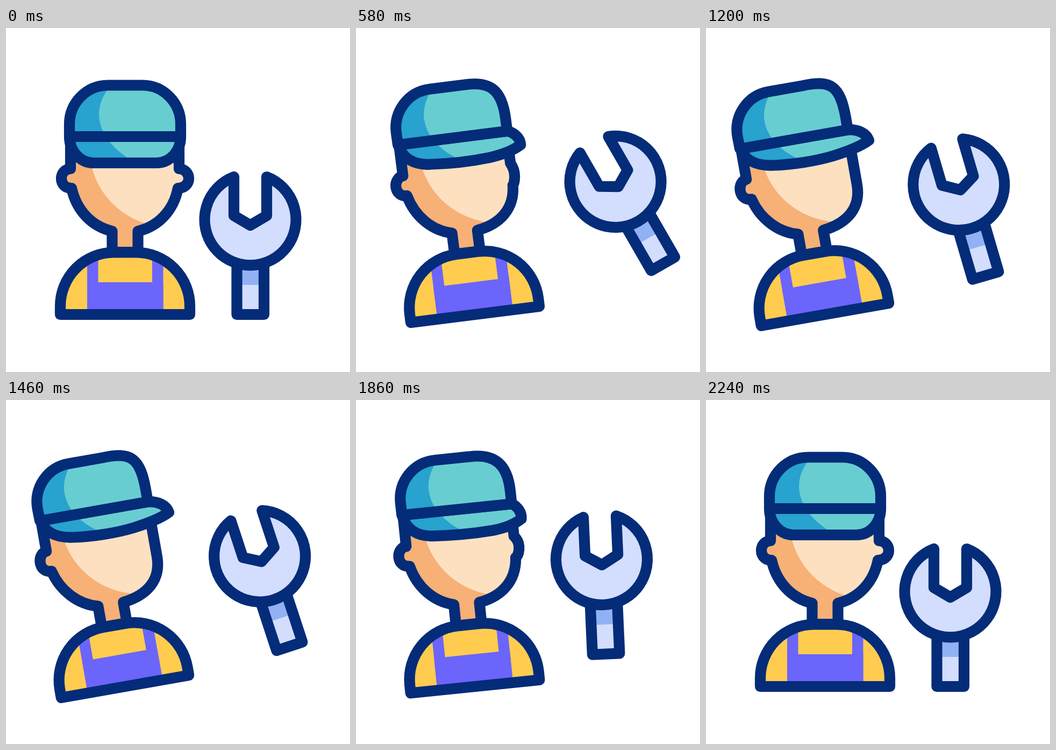
Recreate the animation shown at these times as an HTML page with a canvas. Size 640 by 640 pixels, loop 2.4 s.

```html
<!DOCTYPE html>
<html lang="en">
<head>
<meta charset="utf-8">
<title>Mechanic with wrench</title>
<style>
html, body { margin: 0; width: 100%; height: 100%; overflow: hidden; background: #fff; }
canvas { display: block; width: 640px; height: 640px; }
</style>
</head>
<body>
<canvas id="stage" width="640" height="640"></canvas>
<script>
const ctx = document.getElementById('stage').getContext('2d');
const LOOP = 2400;
const NAVY = '#042c78';
const RAD = Math.PI / 180;
const TILT_MIN = -2.6, TILT_MAX = -30;

// Each shape has a front pose and a turned pose with the same structure.
const head = [
  'M120,202 L120,262 C110,262 103,270 103,280 C103,290 110,298 122,298 C131,339 159,369 197.5,378 L197.5,417 L245.5,417 L245.5,378 C284,369 312,339 320,298 C332,298 340,290 340,280 C340,270 332,262 322,262 L322,202 Z',
  'M121,202 L121,260 C113,260 106,269 106,279 C106,290 113,298 124,298 C134,338 163,368 198,377 L198,417 L245.5,417 L245.5,378 C292,373 322,349 322,305 C322,300 322,290 322,282 C322,276 322,270 322,262 L322,202 Z'
];
const crown = [
  'M118,202 L118,179 C118,139 150,106.5 190,106.5 L254,106.5 C293,106.5 325,139 325,179 L325,202 Z',
  'M119,202 L118.5,179 C118.5,139 150,106.5 190,106.5 L254,106.5 C309,104 323,120 323,179 L323,202 Z'
];
const brim = [
  'M118,202 C118,229 138,251 163,251 C202,251 241,251 280,251 C292.5,251 303.75,245.5 312,236.6 C320,227.75 325,215.5 325,202 Z',
  'M120,202 C126,228 146,239 175,243 C210,248 253,249 288,245 C316,241.5 340,237 358,228 C356,214 342,205 325,202 Z'
];
const capLight = new Path2D('M196,105 C180,125 173,142 173,160 C173,192 195,225 240,250 L380,260 L380,90 Z');
const faceLight = new Path2D('M157,245 C165,300 205,350 270,367 L360,390 L360,190 L157,190 Z');
const torso = new Path2D('M101,533 V517.5 A100,100 0 0 1 201,417.5 H242 A100,100 0 0 1 342,517.5 V533 Z');
const handle = new Path2D('M429.5,430 V533 H480 V430 Z');
const jaw = new Path2D('M424,277 V349 L454.5,367 L485,349 V277 A85,85 0 1 1 424,277 Z');

function morph([a, b], k) {
  const to = b.match(/[\d.]+/g);
  let i = 0;
  return new Path2D(a.replace(/[\d.]+/g, n => (+n + (to[i++] - n) * k).toFixed(3)));
}

// Cubic ease-in-out with handles at .42 and .58
function ease(x) {
  if (x <= 0) return 0;
  if (x >= 1) return 1;
  let lo = 0, hi = 1, s = 0.5;
  for (let i = 0; i < 24; i++) {
    s = (lo + hi) / 2;
    const v = 3 * s * (1 - s) * (0.42 * (1 - s) + 0.58 * s) + s * s * s;
    if (v < x) lo = s; else hi = s;
  }
  return s * s * (3 - 2 * s);
}

const ramp = (t, from, to) => ease((t - from) / (to - from));

function swing(t) {
  if (t < 575) return TILT_MAX * ramp(t, 200, 575);
  if (t >= 1825) return TILT_MIN * (1 - ramp(t, 1825, 2230));
  const n = Math.floor((t - 575) / 250);
  const k = ease((t - 575) / 250 - n);
  return TILT_MAX + (TILT_MIN - TILT_MAX) * (n % 2 ? 1 - k : k);
}

function shape(path, base, paint) {
  ctx.save();
  ctx.clip(path);
  ctx.fillStyle = base;
  ctx.fill(path);
  if (paint) paint();
  ctx.restore();
  ctx.stroke(path);
}

function patch(color, path) {
  ctx.fillStyle = color;
  ctx.fill(path);
}

function box(color, x, y, w, h) {
  ctx.fillStyle = color;
  ctx.fillRect(x, y, w, h);
}

function pivot(x, y, angle, dy, draw) {
  ctx.save();
  ctx.translate(x, y + dy);
  ctx.rotate(angle * RAD);
  ctx.translate(-x, -y);
  draw();
  ctx.restore();
}

function worker(k) {
  shape(morph(head, k), '#f7b076', () => patch('#fde0c0', faceLight));
  shape(torso, '#ffcc50', () => {
    box('#6b65fb', 151, 400, 20.5, 140);
    box('#6b65fb', 272, 400, 20.5, 140);
    box('#6b65fb', 151, 473, 141.5, 67);
  });
  const shine = () => patch('#68cdd1', capLight);
  shape(morph(brim, k), '#28a2ce', shine);
  shape(morph(crown, k), '#28a2ce', shine);
}

function wrench() {
  shape(handle, '#d3ddfe', () => box('#92b1f4', 429, 430, 52, 48));
  shape(jaw, '#d3ddfe');
}

function render(t) {
  ctx.fillStyle = '#fff';
  ctx.fillRect(0, 0, 640, 640);
  ctx.strokeStyle = NAVY;
  ctx.lineWidth = 20.2;
  ctx.lineJoin = ctx.lineCap = 'round';

  const turn = ramp(t, 200, 800) - ramp(t, 1590, 2190);
  const lift = ramp(t, 200, 575) - ramp(t, 1795, 2230);
  pivot(221.5, 533, -10 * turn, 0, () => worker(turn));
  pivot(454.6, 300, swing(t), -63 * lift, wrench);
}

let start;
function tick(now) {
  if (start === undefined) start = now;
  render((now - start) % LOOP);
  requestAnimationFrame(tick);
}
render(0);
requestAnimationFrame(tick);
</script>
</body>
</html>
```
